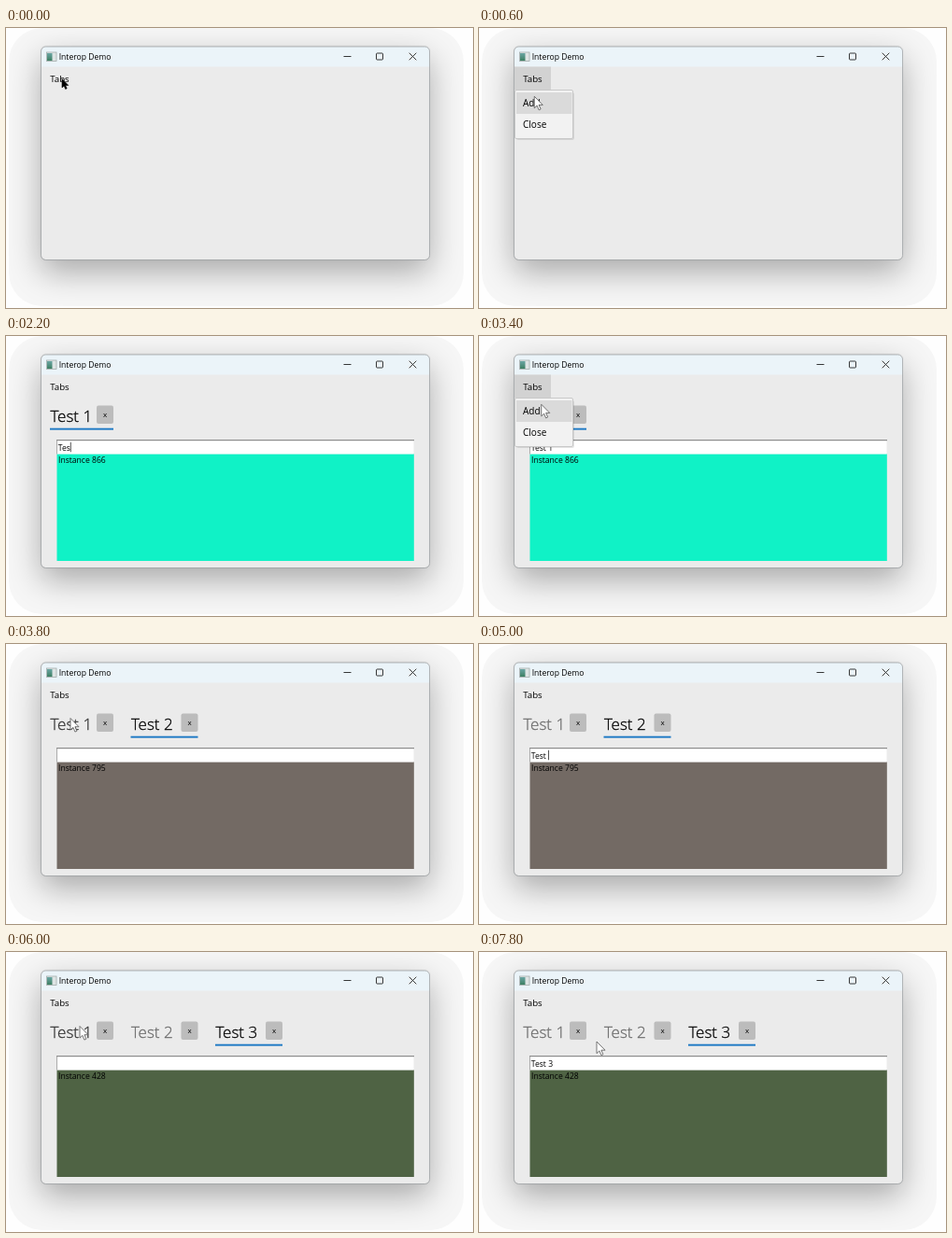
Animation of 500 by 300 pixels, one loop 8 s. Source, as an HTML page:

```html
<!DOCTYPE html>
<html lang="en">
<head>
<meta charset="utf-8">
<title>Tabs demo</title>
<style>
  html, body { margin: 0; width: 100%; height: 100%; overflow: hidden; background: #fff; }
  #stage { position: relative; width: 500px; height: 300px; overflow: hidden; background: #fefefe; }
  #halo { position: absolute; left: 3px; top: 0; width: 487px; height: 298px; border-radius: 36px; background: #f6f6f6; }
  #shade { position: absolute; left: 38px; top: 20px; width: 415px; height: 228px; border-radius: 5px;
    box-shadow: 0 13px 34px rgba(0, 0, 0, .32), 0 0 2px rgba(0, 0, 0, .25); }
  svg { position: absolute; left: 0; top: 0; }
  text { font-family: "Open Sans", "Noto Sans", sans-serif; font-size: 8.6px; fill: #000; white-space: pre; }
  .menu { font-size: 10px; }
  .head { font-size: 17px; font-weight: 300; stroke-width: .3; }
  .line { fill: none; stroke: #222; stroke-width: .9; }
</style>
</head>
<body>
<div id="stage">
  <div id="halo"></div>
  <div id="shade"></div>
  <svg width="500" height="300" viewBox="0 0 500 300">
    <defs>
      <clipPath id="frame"><rect x="38" y="20" width="415.5" height="228" rx="5"/></clipPath>
      <linearGradient id="pane" x2="0" y2="1">
        <stop stop-color="#6aa6a4"/><stop offset="1" stop-color="#3d7f62"/>
      </linearGradient>
    </defs>
    <g clip-path="url(#frame)">
      <rect x="37" y="20" width="417" height="229" fill="#ebebeb"/>
      <rect x="37" y="20" width="417" height="21.5" fill="#ebf4f9"/>
    </g>
    <rect x="37.5" y="20" width="416" height="228.5" rx="5" fill="none" stroke="#a4a8aa" stroke-width=".8"/>
    <rect x="43.5" y="26" width="10.5" height="9.5" fill="#dfe5e5" stroke="#a3acab" stroke-width=".8"/>
    <rect x="44" y="27" width="5.5" height="8" fill="url(#pane)"/>
    <text x="56.7" y="34">Interop Demo</text>
    <path class="line" d="M361.5 30.5h8M431.7 26.7l7.6 7.6m0-7.6l-7.6 7.6"/>
    <rect class="line" x="396.5" y="27" width="7" height="7" rx="1"/>

    <g id="body">
      <rect id="panel" x="54.5" y="126.4" width="382.3" height="114.6"/>
      <rect x="54.5" y="111.7" width="382" height="14.7" fill="#fff"/>
      <path d="M54 111.7h383" stroke="#777" fill="none"/>
      <path d="M54.5 111.5v15" stroke="#999" stroke-width=".8" fill="none"/>
      <text id="typed" x="55.8" y="122.8"></text>
      <path id="caret" d="M56.2 113.8v10.5" stroke="#222" stroke-width=".8"/>
      <text id="label" x="56" y="136.2"></text>
    </g>
    <g id="tabs"></g>

    <rect id="hot" x="38" y="41.5" width="39" height="25" fill="#d2d2d2"/>
    <text x="47.2" y="57.8" style="font-size:9.7px">Tabs</text>
    <g id="popup">
      <rect x="40" y="69" width="62" height="51" rx="2" fill="#000" opacity=".1"/>
      <rect x="38.5" y="66.5" width="62" height="52" rx="1.5" fill="#f2f2f2" stroke="#c9c9c9"/>
      <rect id="addHot" x="40" y="69" width="59.5" height="23" fill="#dadada"/>
      <text class="menu" x="47" y="83.8">Add</text>
      <text class="menu" x="47" y="107">Close</text>
    </g>
    <path id="cursor" d="M0 0V12.6L2.9 9.9L4.9 14.6L6.9 13.7L4.9 9.2H9Z" stroke-width=".8" stroke-linejoin="round"/>
  </svg>
</div>
<script>
const LOOP = 8000, STEP = 200;
const LEAD = 600;   // menu opens this long before a tab is added
const REST = 200;   // pointer stays on the menu item after the tab is added
const FOCUS = 400;  // the text box is clicked
const TYPE = 600;   // typing begins

// One entry per added tab: when it is added, ms per typed letter, content.
const rounds = [
  { born: 1000, pace: 200, color: "#10f2c6", id: 866 },
  { born: 3800, pace: 120, color: "#736a64", id: 795 },
  { born: 5800, pace: 120, color: "#4f6344", id: 428 }
];

const $ = id => document.getElementById(id);
const show = (el, on) => el.setAttribute("visibility", on ? "visible" : "hidden");
const clamp = k => Math.min(1, Math.max(0, k));
const easeOut = k => 1 - (1 - k) ** 2;
const mix = (a, b, k) => a.map((v, i) => v + (b[i] - v) * k);

let left = 47;
rounds.forEach((r, i) => {
  const w = i ? 72 : 68;
  const g = document.createElementNS("http://www.w3.org/2000/svg", "g");
  g.setAttribute("transform", `translate(${left})`);
  g.innerHTML = `<text class="head" x=".4" y="91.7">Test ${i + 1}</text>
    <rect x="${w - 18}" y="74.5" width="18" height="19.5" rx="2" fill="#bcbcbc"/>
    <text x="${w - 9}" y="87" text-anchor="middle" style="font-size:8px">x</text>
    <rect y="98.7" width="${w}" height="1.9" fill="#1b78c4"/>`;
  $("tabs").append(g);
  Object.assign(r, { name: `Test ${i + 1}`, x: left, w, tab: g, item: [59 + 10 * i, 79.5] });
  left += w + 18.5;
});

const lettersAt = (r, t) => Math.floor((t - r.born - TYPE) / r.pace);

function pointerAt(t, now, next) {
  if (next && (!now || t >= next.born - LEAD)) {
    return mix([60, 54.5], next.item, easeOut(clamp((t - next.born + LEAD) / 400)));
  }
  const age = t - now.born;
  if (age < TYPE) return mix(now.item, [130, 113], clamp((age - REST) / (TYPE - REST)));
  if (next || lettersAt(now, t) < now.name.length) return null;
  const k = clamp((t - 7200) / 600);
  return [256 - 130 * k, 96 - 46 * Math.sin(Math.PI * k)];
}

function draw(t) {
  const now = rounds.findLast(r => t >= r.born);
  const next = rounds.find(r => t < r.born);
  const open = next && t >= next.born - LEAD;
  const p = pointerAt(t, now, next);

  show($("body"), now);
  if (now) {
    const letters = lettersAt(now, t);
    $("panel").setAttribute("fill", now.color);
    $("label").textContent = "Instance " + now.id;
    $("typed").textContent = now.name.slice(0, Math.max(0, letters));
    $("caret").setAttribute("transform", `translate(${$("typed").getComputedTextLength()})`);
    const focused = t >= now.born + FOCUS && letters < now.name.length;
    $("caret").style.display = focused ? "" : "none";
  }

  for (const r of rounds) {
    const over = p && p[1] > 70 && p[1] < 99 && p[0] >= r.x && p[0] < r.x + r.w;
    const color = r === now ? "#000" : over ? "#333" : "#6c6c6c";
    show(r.tab, t >= r.born);
    show(r.tab.lastChild, r === now);
    r.tab.firstChild.style.fill = r.tab.firstChild.style.stroke = color;
  }

  show($("hot"), open);
  show($("popup"), open);
  show($("addHot"), open && t >= next.born - LEAD + STEP);

  const idle = !now && !open;
  show($("cursor"), p);
  if (p) $("cursor").setAttribute("transform", `translate(${p}) scale(${idle ? .75 : 1})`);
  $("cursor").setAttribute("fill", idle ? "#000" : "#fff");
  $("cursor").setAttribute("stroke", idle ? "#000" : "#555");
}

let last = -1;
const start = performance.now();
function tick() {
  const t = Math.floor((performance.now() - start) % LOOP / STEP) * STEP;
  if (t !== last) draw(last = t);
  requestAnimationFrame(tick);
}
tick();
</script>
</body>
</html>
```
